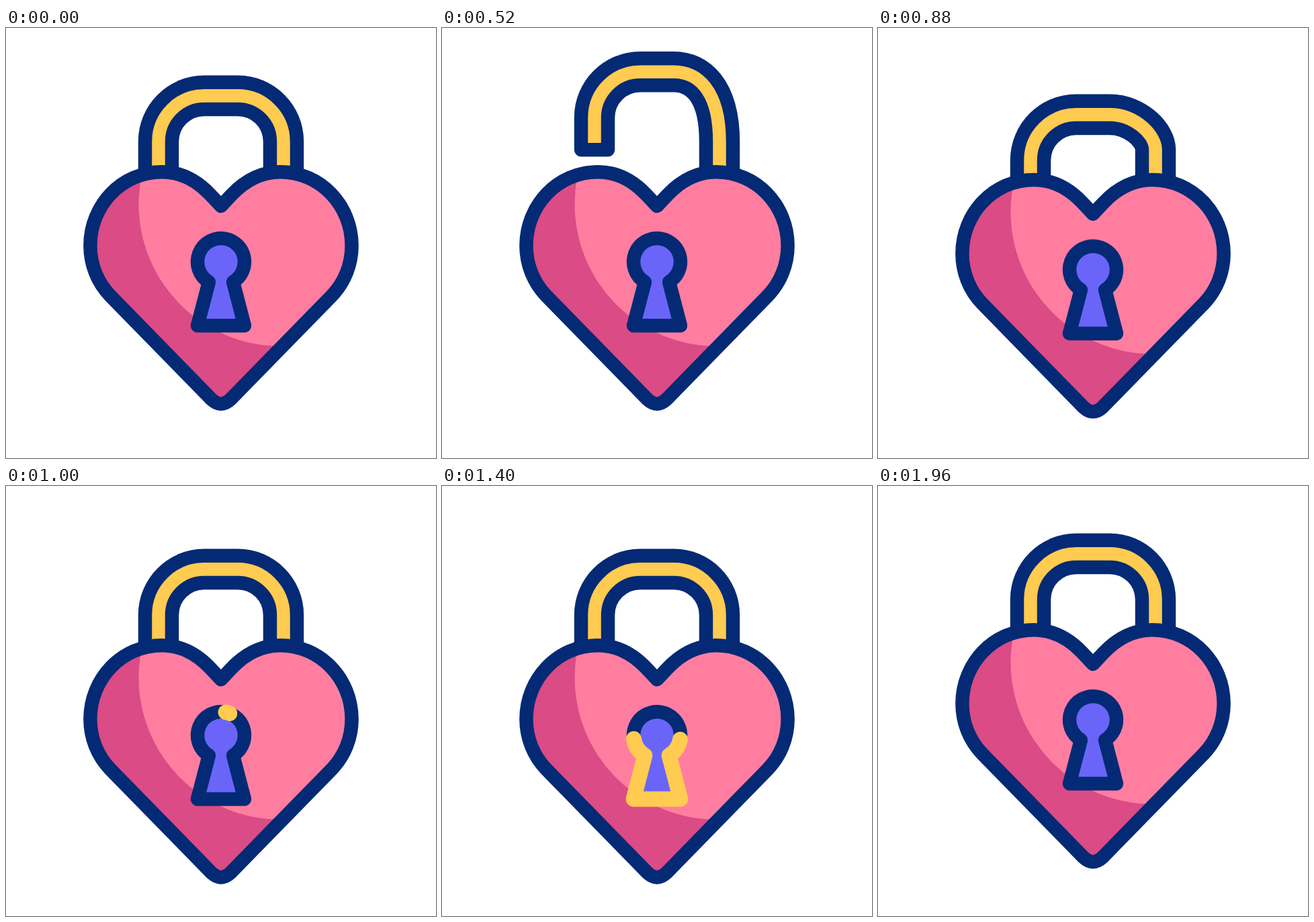
Write an HTML page that moves like this. It is 640 px wide and 640 px high and loops after 2 s.

```html
<!DOCTYPE html>
<html>
<head>
<meta charset="utf-8">
<title>Heart padlock</title>
<style>
html, body { margin: 0; height: 100%; overflow: hidden; background: #fff; }
svg { display: block; width: 100vw; height: 100vh; }
.line { stroke: #042a75; stroke-width: 20.48; stroke-linejoin: round; }
</style>
</head>
<body>
<svg viewBox="0 0 640 640">
  <defs>
    <path id="heart" d="M320 265L304 248C286 229 262 214.2 232 214.2C172 214.2 125.4 264 125.4 324C125.4 352 136 378.5 155 398.3L306 552.8Q320 566 334 552.8L485 398.3C504 378.5 514.6 352 514.6 324C514.6 264 468 214.2 408 214.2C378 214.2 354 229 336 248Z"/>
    <path id="hole" pathLength="1" d="M327 313.7A35 35 0 0 1 338 378L355 443H285L302 378A35 35 0 0 1 327 313.7Z"/>
    <clipPath id="inside"><use href="#heart"/></clipPath>
  </defs>
  <g id="lock">
    <path id="shackle" class="line" fill="#ffcb50"/>
    <use href="#heart" fill="#db4b85"/>
    <circle cx="409" cy="262" r="211.5" fill="#ff7ea0" clip-path="url(#inside)"/>
    <use href="#heart" class="line" fill="none"/>
    <use href="#hole" class="line" fill="#6a65f8"/>
    <use id="glow" href="#hole" fill="none" stroke="#ffcb50" stroke-width="22.8" stroke-linecap="round" stroke-linejoin="round"/>
  </g>
</svg>
<script>
const [lock, shackle, glow] = ["lock", "shackle", "glow"].map(id => document.getElementById(id));

// Smooth progress from 0 to 1 between times a and b
function ease(t, a, b) {
  const u = Math.min(1, Math.max(0, (t - a) / (b - a)));
  return u * u * (3 - 2 * u);
}

// The right leg stays in the heart; all other points move by d
function shacklePath(d) {
  return `M207 ${217 + d}V${169 + d}C207 ${120.4 + d} 246.4 ${80.8 + d} 295 ${80.8 + d}H345
    C393.6 ${80.8 + d} 433 ${120.4 + d} 433 169V230H393V169
    C393 ${142.5 + d} 371.5 ${121 + d} 345 ${121 + d}H295
    C268.5 ${121 + d} 247 ${142.5 + d} 247 ${169 + d}V${217 + d}Z`;
}

function draw(now) {
  const t = now % 2000;
  const drop = 23 * (ease(t, 800, 960) - ease(t, 1567, 1900));
  const slide = -35 * ease(t, 0, 333) - 15 * ease(t, 500, 667)
    + 66.7 * ease(t, 667, 867) - 16.7 * ease(t, 867, 1000);
  const head = ease(t, 955, 1562), tail = ease(t, 1240, 1925);

  lock.setAttribute("transform", `translate(0 ${drop})`);
  shackle.setAttribute("d", shacklePath(slide));
  glow.setAttribute("visibility", head > tail ? "visible" : "hidden");
  glow.setAttribute("stroke-dasharray", `${head - tail} 2`);
  glow.setAttribute("stroke-dashoffset", -tail);
}

function tick() {
  draw(performance.now());
  requestAnimationFrame(tick);
}
tick();
</script>
</body>
</html>
```
